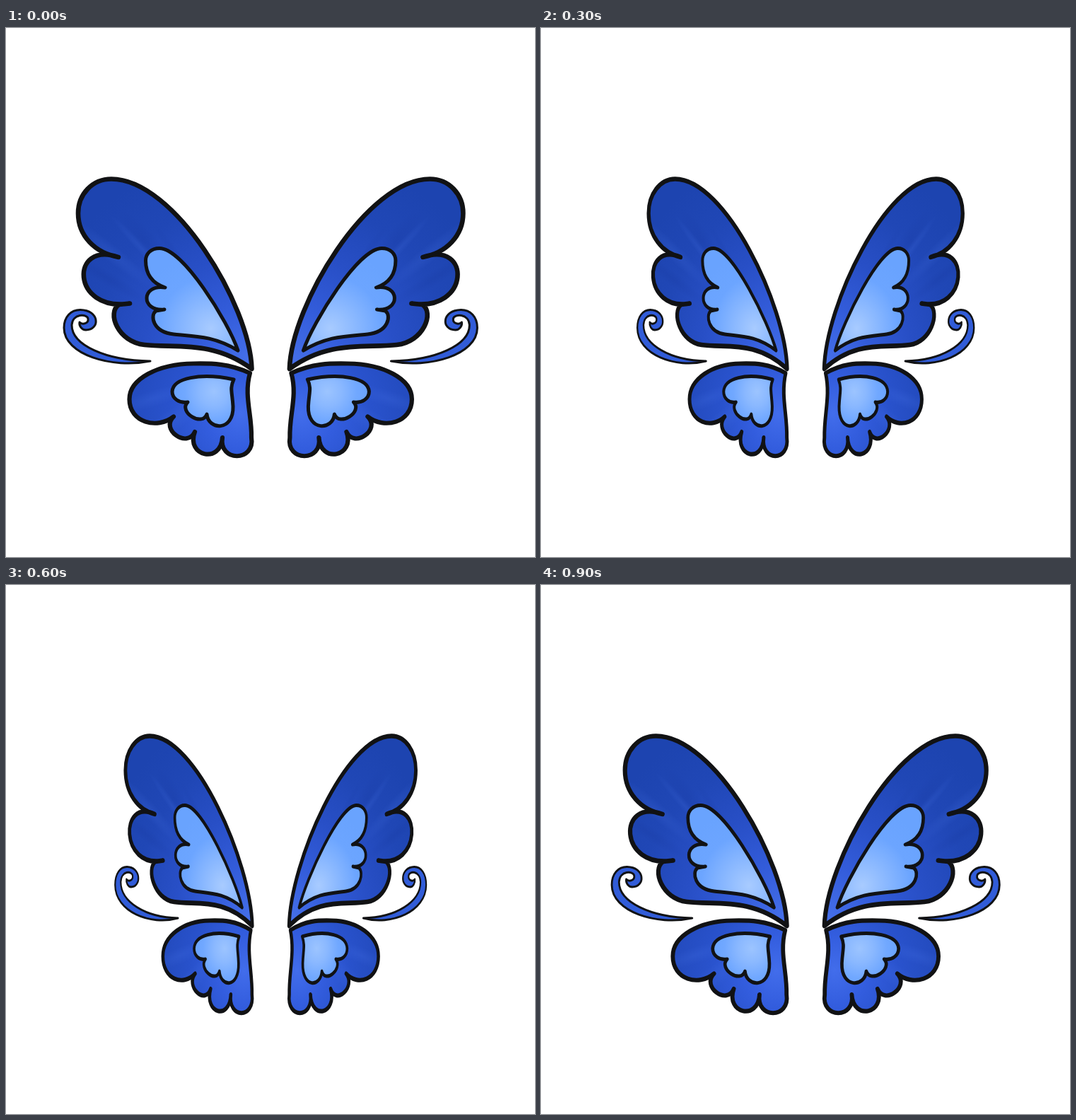
Animation of 748 by 748 pixels, one loop 1 s. Source, as an HTML page with a canvas:

```html
<!DOCTYPE html>
<html lang="en">
<head>
<meta charset="utf-8">
<title>Butterfly wings</title>
<style>
  html, body { margin: 0; width: 100%; height: 100%; overflow: hidden; background: #fff; }
  canvas { display: block; width: 100vw; height: 100vh; }
</style>
</head>
<body>
<canvas id="stage" width="748" height="748"></canvas>
<script>
const ctx = document.getElementById('stage').getContext('2d');
const SIZE = 748, AXIS = 374.2, HINGE = 350;
const STEP = 100, STEPS = 10, SHRINK = 0.0674;
const INK = '#111214', FLARE = 0.14;

// Closed shape of cubic curves [c1x, c1y, c2x, c2y, x, y],
// straight lines [x, y] and round scallops [x, y, bulge].
function shape(x, y, ...segments) {
  const path = new Path2D();
  path.moveTo(x, y);
  for (const s of segments) {
    const [ex, ey] = s.slice(s.length === 6 ? 4 : 0);
    if (s.length === 6) {
      path.bezierCurveTo(...s);
    } else if (s.length === 2) {
      path.lineTo(ex, ey);
    } else {
      const dx = ex - x, dy = ey - y, k = s[2] / Math.hypot(dx, dy);
      path.bezierCurveTo(
        x - dy * k - dx * FLARE, y + dx * k - dy * FLARE,
        ex - dy * k + dx * FLARE, ey + dx * k + dy * FLARE, ex, ey);
    }
    [x, y] = [ex, ey];
  }
  path.closePath();
  return path;
}

function glow(x, y, r, ...colors) {
  const g = ctx.createRadialGradient(x, y, 0, x, y, r);
  colors.forEach((c, i) => g.addColorStop(i / (colors.length - 1), c));
  return g;
}

function randomizer(seed) {
  return () => (seed = seed * 16807 % 2147483647) / 2147483647;
}

const upper = {
  path: shape(347.5, 482,
    [345, 392, 238, 213.5, 149, 213.5],
    [122, 213.5, 102, 235, 102, 262],
    [102, 294, 126, 318, 159, 324],
    [90, 300, 92, 402, 175, 389.5],
    [160, 391],
    [142, 402, 158, 444, 196, 448],
    [240, 453, 292, 441, 347.5, 482]),
  fill: glow(345, 470, 300, '#456fe9', '#335cda', '#284fc6', '#2047b6', '#1d44b0'),
  line: 6.6,
  streaks: 16
};

const upperPanel = {
  path: shape(328, 456,
    [314, 415, 250, 311.5, 217, 311.5],
    [205, 311.5, 197.5, 319, 197.5, 329],
    [197.5, 352, 210, 362, 225, 367],
    [224, 398, 34],
    [212, 400],
    [203, 407, 208, 430, 237, 433],
    [270, 436, 295, 436, 328, 456]),
  fill: glow(290, 425, 110, '#a8cbff', '#8ab8ff', '#6ca5ff', '#69a3fe'),
  line: 5
};

const lower = {
  path: shape(345, 488,
    [315, 474, 290, 474, 265, 474.5],
    [215, 475, 174.5, 496, 174.5, 525],
    [174.5, 558, 214, 568, 237, 549.5],
    [267, 571, 26],
    [306, 579, 37],
    [347, 579, 35],
    [348, 547, 336, 520, 345, 488]),
  fill: glow(332, 545, 150, '#426deb', '#335dde', '#2952cc', '#244cc0'),
  line: 6.2,
  streaks: 8
};

const lowerPanel = {
  path: shape(322, 497,
    [275, 487, 236, 495, 235, 514],
    [235, 524, 245, 531, 257, 529],
    [284, 546, 19],
    [286, 569, 322, 571, 321, 535],
    [320, 515, 316, 510, 322, 497]),
  fill: glow(294, 514, 62, '#9cc4ff', '#8ab8ff', '#71a8ff', '#68a2fe'),
  line: 5
};

const curl = {
  path: shape(204, 471,
    [150, 482, 82, 462, 82, 424],
    [82, 408, 92, 398.5, 105, 398.5],
    [133, 399, 133, 427, 113, 427],
    [107, 427, 103, 421, 104, 416],
    [108, 420, 117, 418, 116, 411],
    [115, 404, 94, 403, 93, 420],
    [93, 448, 140, 470, 204, 471]),
  fill: '#315cd8',
  line: 3
};

const parts = [upper, upperPanel, lower, lowerPanel, curl];

// Faint brush marks fanning out from the hinge.
function drawStreaks(path, count) {
  const rand = randomizer(4711);
  ctx.save();
  ctx.clip(path);
  for (let i = 0; i < count; i++) {
    const tone = i % 2 ? '20,50,150' : '80,125,240';
    ctx.save();
    ctx.translate(HINGE, 480);
    ctx.rotate(Math.PI * (0.7 + 0.7 * rand()));
    ctx.translate(80 + 190 * rand(), 0);
    ctx.scale(50 + 30 * rand(), 6 + 10 * rand());
    ctx.fillStyle = glow(0, 0, 1, `rgba(${tone},.16)`, `rgba(${tone},0)`);
    ctx.fillRect(-1, -1, 2, 2);
    ctx.restore();
  }
  ctx.restore();
}

function drawPart({ path, fill, line, streaks }) {
  ctx.fillStyle = fill;
  ctx.fill(path);
  if (streaks) drawStreaks(path, streaks);
  ctx.lineWidth = line;
  ctx.stroke(path);
}

function drawWing(squeeze) {
  ctx.save();
  ctx.translate(HINGE, 0);
  ctx.scale(squeeze, 1);
  ctx.translate(-HINGE, 0);
  parts.forEach(drawPart);
  ctx.restore();
}

function draw(time) {
  const step = Math.floor(time / STEP) % STEPS;
  const squeeze = 1 - SHRINK * Math.min(step, STEPS - step);
  ctx.fillStyle = '#fff';
  ctx.fillRect(0, 0, SIZE, SIZE);
  ctx.strokeStyle = INK;
  ctx.lineJoin = ctx.lineCap = 'round';
  drawWing(squeeze);
  ctx.save();
  ctx.translate(2 * AXIS, 0);
  ctx.scale(-1, 1);
  drawWing(squeeze);
  ctx.restore();
}

const start = performance.now();
function tick(now) {
  draw(Math.max(0, now - start));
  requestAnimationFrame(tick);
}
draw(0);
requestAnimationFrame(tick);
</script>
</body>
</html>
```
